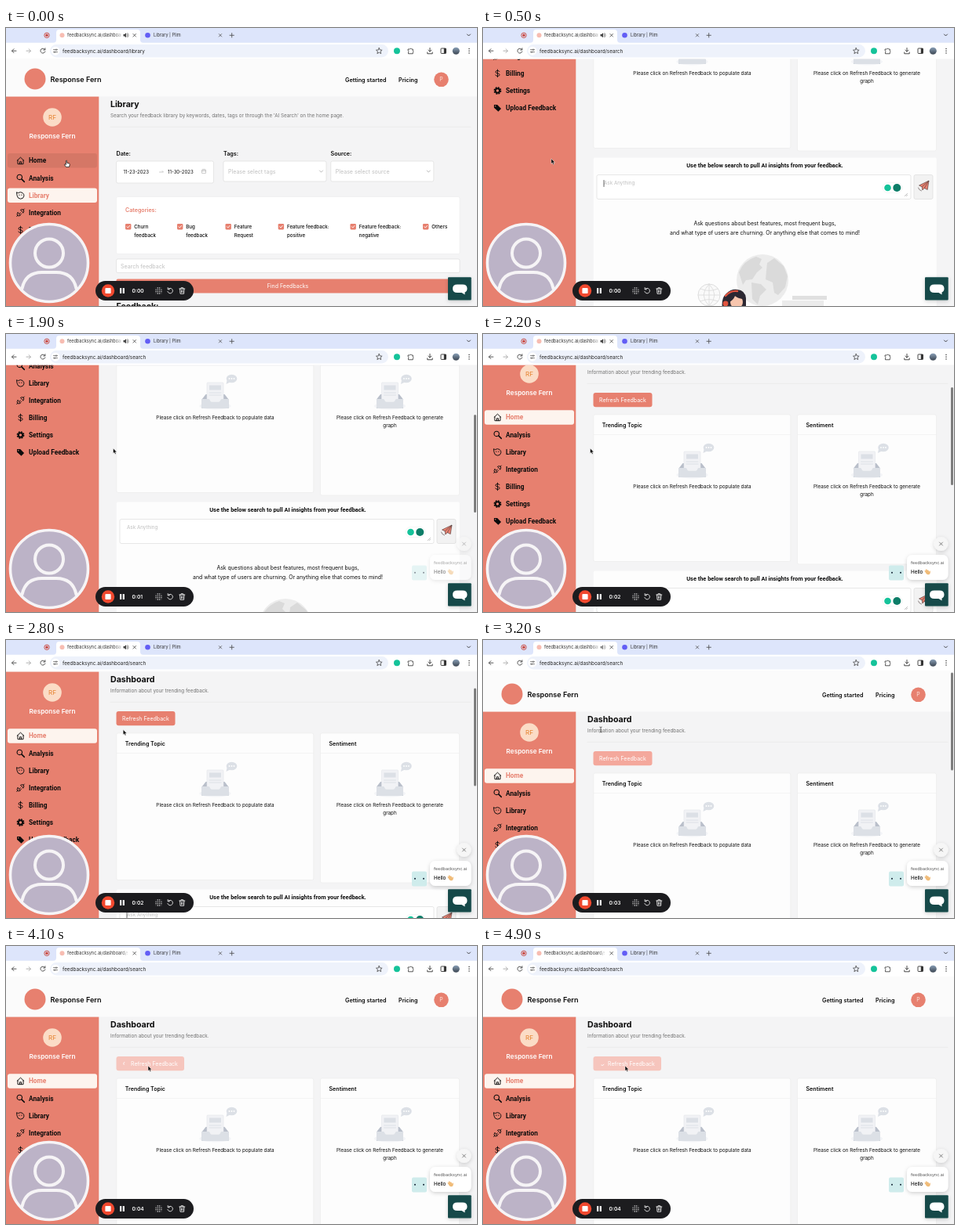
An HTML page that plays this animation: 600 px wide and 355 px high, repeating every 5 s.

```html
<!DOCTYPE html>
<html lang="en">
<head>
<meta charset="utf-8">
<title>Dashboard walkthrough</title>
<style>
html, body { margin: 0; width: 100%; height: 100%; overflow: hidden; background: #fff; }
svg { display: block; width: 100%; height: 100%; }
text { font-family: Inter, "Open Sans", sans-serif; white-space: pre; }
.rob { font-family: Roboto, Arial, sans-serif; }
</style>
</head>
<body>
<svg id="stage" viewBox="0 0 600 355"></svg>
<script>
const CORAL = '#e7806f', INK = '#0c0c0c', LOOP = 5000, STEP = 100;
const BRAND = 'Response Fern';

// Markup helpers
const text = (x, y, s, size, fill = INK, weight = 400, extra = '') =>
  `<text x="${x}" y="${y}" font-size="${size}" fill="${fill}" font-weight="${weight}" ${extra}>${s}</text>`;
const mid = 'text-anchor="middle"';
const box = (x, y, w, h, fill, r = 0, extra = '') =>
  `<rect x="${x}" y="${y}" width="${w}" height="${h}" rx="${r}" fill="${fill}" ${extra}/>`;
const dot = (x, y, r, fill, extra = '') => `<circle cx="${x}" cy="${y}" r="${r}" fill="${fill}" ${extra}/>`;
const line = (d, color = INK, w = 1, extra = '') =>
  `<path d="${d}" fill="none" stroke="${color}" stroke-width="${w}" stroke-linecap="round" stroke-linejoin="round" ${extra}/>`;
const shape = (d, fill, extra = '') => `<path d="${d}" fill="${fill}" ${extra}/>`;
const group = (id, body, extra = '') => `<g id="${id}" ${extra}>${body}</g>`;
const at = (x, y, body) => `<g transform="translate(${x} ${y})">${body}</g>`;
const cross = (x, y, r, color, w) =>
  line(`M${x - r} ${y - r}l${2 * r} ${2 * r}m0 ${-2 * r}l${-2 * r} ${2 * r}`, color, w);
const border = (c = '#d9d9d9') => `stroke="${c}" stroke-width=".6"`;

function browser() {
  return box(0, 0, 600, 39.5, '#fff') + box(0, 0, 600, 18.8, '#dde5fb') +
    dot(52, 9.3, 3.2, 'none', 'stroke="#c9453c" stroke-width=".9"') + dot(52, 9.3, 1.7, '#c9453c') +
    shape('M60 19q4 0 4-4V6q0-4 4-4h99q4 0 4 4v9q0 4 4 4z', '#fff') +
    dot(71.5, 9.3, 3, '#f7bdb2') +
    `<g clip-path="url(#tabClip)">${text(78, 11.3, 'feedbacksync.ai/dashboard/search', 5.6, '#333')}</g>` +
    box(146, 4, 10, 11, 'url(#tabFade)', 0, 'id="tabEnd"') +
    group('audio', shape('M149.5 8h1.5l2-1.8v6l-2-1.8h-1.5z', '#444') +
      line('M154 7.6q1.5 1.6 0 3.2M155 6.5q2.6 2.7 0 5.4', '#444', .6)) +
    cross(163.7, 9.3, 1.8, '#444', .8) +
    dot(180.5, 9.3, 3.3, '#625df5') + text(188, 11.3, 'Library | Plim', 5.6, '#333') +
    cross(273, 9.3, 1.7, '#555', .8) + line('M285 9.3h5.4m-2.7-2.7v5.4', '#444', .8) +
    line('M587.5 8l2 2 2-2', '#333', .9) +
    line('M13 29.2H7.6m2.4-2.5l-2.5 2.5 2.5 2.5', '#444', .9) +
    line('M26 29.2h5.4m-2.4-2.5l2.5 2.5-2.5 2.5', '#aaa', .9) +
    line('M49.6 27.6a3 3 0 1 0 .3 2.4M49.9 25.8v2.2h-2.2', '#444', .9) +
    box(56, 21, 431, 16.5, '#eef2fb', 8.2) + dot(63, 29.2, 5.5, '#fff') +
    line('M60.5 27.7h2.5m2 0h.5M60.5 30.7h.5m2 0h2.5', '#444', .7) +
    dot(64, 27.7, .8, 'none', 'stroke="#444" stroke-width=".6"') +
    dot(62, 30.7, .8, 'none', 'stroke="#444" stroke-width=".6"') +
    '<text id="url" x="72" y="31.5" font-size="6.35" fill="#222"></text>' +
    line('M475.3 25.5l1.1 2.5 2.7.2-2 1.8.6 2.7-2.4-1.5-2.4 1.5.6-2.7-2-1.8 2.7-.2z', '#444', .8) +
    dot(498, 29.2, 4, '#15c39a') +
    line('M512.5 27h2a1.2 1.2 0 0 1 2.2 0h1.6v2a1.2 1.2 0 0 1 0 2.2v1.6h-5.8v-2a1 1 0 0 0 0-1.8z', '#444', .9) +
    line('M540 25.5v4.5m-2-1.8l2 2 2-2M536.8 31v1.8h6.4V31', '#333', .9) +
    box(554, 26, 6.5, 6.5, 'none', .8, 'stroke="#333" stroke-width=".9"') + box(557.8, 26, 2.7, 6.5, '#333') +
    dot(573.3, 29.2, 4.5, 'url(#photo)') +
    [26.5, 29.2, 31.9].map(y => dot(590, y, .75, '#333')).join('');
}

const icons = [
  line('M-4.3-.2L0-4.3 4.3-.2M-3.5-.8v5h7v-5M-1 4.2V1.3h2v2.9', INK, .95),
  line('M1.3 1.3L4.8 4.8', INK, 1.5) + dot(-1.2, -1.2, 3.2, 'none', `stroke="${INK}" stroke-width="1.1"`),
  line('M-4.6-3.8l1.6.7Q0-5 2.6-3.2 4.8-1.500 4.400 1 3.600 4.500 0 4.500-3.800 4.300-4.400.5z', INK, .95) +
    dot(-1.6, -.5, .6, INK) + dot(1.4, -.5, .6, INK),
  line('M-4.8 4.8l1.6-1.6m6.4-6.4l1.6-1.6M-3.4 0l3.3 3.4q-2.2 1.6-3.7.1T-3.4 0zM3.4 0L0-3.4q2-1.600 3.700-.1T3.400 0zM-1.200 1l1-1M.2 2.200l1-1', INK, .95),
  line('M2.5-2.3Q2-3.5 0-3.5q-2.500.1-2.500 1.800 0 1.500 2.500 1.700 2.700.3 2.700 1.900Q2.600 3.500 0 3.500q-2.100 0-2.700-1.400M0-4.800V4.800', INK, .9),
  dot(0, 0, 2.7, 'none', `stroke="${INK}" stroke-width="2"`) +
    dot(0, 0, 4.2, 'none', `stroke="${INK}" stroke-width="1.4" stroke-dasharray="2 1.3"`),
  shape('M-4.5-4h4.2L4.6.8 1 4.6l-5.5-5z', INK) + dot(-2.7, -2.3, .8, CORAL)
];
const labels = ['Home', 'Analysis', 'Library', 'Integration', 'Billing', 'Settings', 'Upload Feedback'];
const navY = i => 172.5 + 22.1 * i;

function sidebar() {
  return box(0, 90, 118.3, 600, CORAL) + dot(59, 117, 11.8, '#fbdcc6') +
    text(59, 120, 'RF', 8.2, '#e5832f', 400, mid) + text(59, 144, BRAND, 8.2, '#fff', 600, mid) +
    box(2, 163, 114, 18.6, '#d57766', 3, 'id="hover"') + box(2, 163, 114, 18.6, '#fdf4ee', 3, 'id="active"') +
    labels.map((s, i) => at(18.5, navY(i), icons[i]) +
      text(29, navY(i) + 2.9, s, 8.3, INK, 700, 'class="rob nav"')).join('');
}

function header() {
  return box(0, -60, 600, 150.6, '#fbfbfb') + dot(37, 68, 13.5, CORAL) + text(56.5, 71.5, BRAND, 9.05, INK, 600) +
    text(432, 71.7, 'Getting started', 7.25, INK, 600) + text(500, 71.7, 'Pricing', 7.25, INK, 600) +
    dot(554.5, 68.8, 9.3, CORAL) + text(554.5, 71.4, 'P', 7, '#fde3dc', 400, mid);
}

const heading = (title, sub) => text(133, 104, title, 10.6, INK, 700) +
  text(133, 116.6, sub, 6.3, '#707070') + line('M133 129.3H592', '#e2e2e2', .6);

const select = (x, s) => box(x, 173, 131, 26, '#fff', 2, border()) + text(x + 6, 188.5, s, 7.05, '#bfbfbf') +
  line(`M${x + 122.5} 185l2 2.2 2-2.2`, '#aaa', .8);

function library() {
  const checks = [[152, 'Churn', 'feedback'], [218, 'Bug', 'feedback'], [279.5, 'Feature', 'Request'],
    [346.7, 'Feature feedback:', 'positive'], [438.5, 'Feature feedback:', 'negative'], [531, 'Others', '']];
  return heading('Library', "Search your feedback library by keywords, dates, tags or through the 'AI Search' on the home page.") +
    [[140.5, 'Date:'], [277, 'Tags:'], [413.5, 'Source:']].map(([x, s]) => text(x, 166, s, 7.2, INK, 600)).join('') +
    box(140.5, 173, 124, 28, '#fff', 2, border()) +
    text(149.5, 188.8, '11-23-2023', 6.05) + text(206, 188.8, '11-30-2023', 6.05) +
    line('M195.5 187h5l-1.5-1.5', '#aaa', .6) +
    box(249.5, 184, 5, 4.6, 'none', .4, border('#aaa')) + line('M249.5 185.7h5M251 183.2v1m2-1v1', '#aaa', .6) +
    select(277, 'Please select tags') + select(413.8, 'Please select source') +
    box(140.5, 218.5, 437.5, 73, '#fff', 2, border('#ececec')) + text(152, 238, 'Categories:', 7.1, CORAL, 600) +
    checks.map(([x, a, b]) => box(x, 253, 7.4, 7.4, CORAL, 1.3) +
      line(`M${x + 2} 256.7l1.3 1.4 2.2-2.6`, '#fff', .9) +
      text(x + 11.3, 259, a, 6.2, INK, 500) + text(x + 11.3, 269.5, b, 6.2, INK, 500)).join('') +
    box(140.5, 298, 437.5, 17.5, '#fff', 2, border()) + text(146, 309.5, 'Search feedback', 7.05, '#bfbfbf') +
    box(140.5, 323.5, 437.5, 18, CORAL, 2) + text(359, 335, 'Find Feedbacks', 7.05, '#fff', 400, mid) +
    text(140.5, 362, 'Feedback:', 10.6, INK, 700);
}

const emptyBox = x => at(x, 0,
  '<ellipse cy="246" rx="20" ry="4.5" fill="#f3f4f7"/>' +
  shape('M-12 231h24l5 6.5v11.5h-34v-11.5z', '#b9bfca') + box(-10.5, 216, 21, 25, '#f1f2f5', 1, border('#e2e4ea')) +
  box(-7.5, 219.5, 15, 6, '#dce0e6') + line('M-7.5 229h15m-15 3h15', '#dce0e6', 1) +
  shape('M-17 237h8.5q1.5 0 2 2 .6 2 2.5 2h8q1.9 0 2.5-2 .5-2 2-2H17v10.5q0 1.5-1.5 1.5h-31q-1.5 0-1.5-1.5z', '#dce0e6') +
  '<ellipse cx="21" cy="211" rx="6.8" ry="5.2" fill="#dce0e6"/>' + shape('M15 213l-1 5 5-2.5z', '#dce0e6') +
  [18, 21, 24].map(d => dot(d, 211, .9, '#fff')).join(''));

function globes() {
  return dot(356, 525, 33, '#ececec') +
    shape('M326 515q6-15 22-20l7 3-3 7 4 4-7 6-6 9-8 1-4 6z', '#dadada') +
    shape('M342 528l12 2 7 7-8 8-3 11-7-7z', '#dadada') +
    shape('M362 503l9-6 12 10 5 13-3 14-9 10-5-3-2-13-9-4 1-11z', '#dadada') +
    dot(288, 544, 14, '#fafafa', 'stroke="#ddd"') +
    line('M274 544h28M288 530v28M277 536q11 5 22 0M277 552q11-5 22 0M288 530q-14 14 0 28M288 530q14 14 0 28', '#ddd', .9) +
    box(394, 545, 44, 5, '#e0e0e0') + box(381, 551, 53, 8, '#ebebeb');
}

function woman() {
  const hair = '#2c2832';
  return shape('M305 562q-2-14 5-20 6-6 14-5 10 1 11 11v14z', hair) +
    line('M309 545q6-7 15-6', '#e0543f', 2.4) + dot(323, 553, 8, '#f7c5ad') +
    shape('M312 554q1-13 12-13 8 0 9 8-8 0-12-4-2 6-9 9z', hair) + dot(309, 555, 3.4, '#e0543f');
}

function dashboard() {
  const card = (x, w, h, s) => box(x, 169, w, h, '#fdfdfd', 2, border('#eaeaea')) +
    text(x + 11, 184.6, s, 7.1, INK, 600) + line(`M${x} 194.5h${w}`, '#eeeeee', .6);
  const hint = (x, y, s) => text(x, y, s, 6.3, INK, 400, mid);
  return heading('Dashboard', 'Information about your trending feedback.') +
    box(140.5, 141, 75, 18.3, CORAL, 3, 'id="btn"') + text(148, 152.7, 'Refresh Feedback', 7, '#fff', 400, 'id="btnText"') +
    line('M2.3 0A2.3 2.3 0 0 1 0 2.3', '#fff', .8, 'id="spin"') +
    card(140.8, 251, 187.5, 'Trending Topic') + card(400.5, 177, 191, 'Sentiment') +
    emptyBox(266.5) + emptyBox(489) +
    hint(266.5, 262.8, 'Please click on Refresh Feedback to populate data') +
    hint(489, 262.8, 'Please click on Refresh Feedback to generate') + hint(489, 272.8, 'graph') +
    box(140.8, 368.5, 437, 300, '#fdfdfd', 2) +
    text(359, 380.8, 'Use the below search to pull AI insights from your feedback.', 7.4, INK, 700, mid + ' class="rob"') +
    box(145, 390.5, 400, 31, '#fff', 2, border()) + text(154, 403.2, 'Ask Anything', 6.3, '#bfbfbf') +
    line('M154 397.5v8', '#222', .7, 'id="caret"') +
    box(509, 400.5, 25, 13, '#fff', 6.5, border('#eee')) + dot(515.5, 407, 4.3, '#15c39a') + dot(527.3, 407, 5, '#0d7d68') +
    line('M537.5 417.5l3-3m-1 3l1-1', '#888', .6) +
    box(549, 390.5, 24, 31, '#f2f2f2', 2, border()) +
    shape('M555.5 404l12.5-6-1.8 11.5-4-2-2.4 2.5-.5-4z', CORAL, 'stroke="#4b3a3a" stroke-width=".6"') +
    line('M559.5 405.5l8.5-7.5-5.8 9.5M554.5 407q.5 3 4 4', '#4b3a3a', .6) +
    text(359, 455.4, 'Ask questions about best features, most frequent bugs,', 6.92, INK, 400, mid) +
    text(359, 467.2, 'and what type of users are churning. Or anything else that comes to mind!', 6.92, INK, 400, mid) +
    globes() + woman();
}

function chat() {
  const wave = shape('M-3-1.5q1-1.5 2 0l-.8-1.7q.8-1.2 1.7 0l.6 1q.7-1 1.5 0l.9 2 .5-1.4q1.2-.2 1 1.4-.2 3.2-2.3 3.5-1.7.2-3-1.4z', '#f0bb78');
  return group('greeting',
    box(517, 295.5, 19, 19, '#cfecec', 2) + dot(521, 304.8, 1, '#123') + dot(532, 304.8, 1, '#123') +
    box(540, 282, 52.5, 32, '#fff', 7, 'filter="url(#soft)"') +
    text(545, 294.3, 'feedbacksync.ai', 5.45, '#555') + text(545, 306.3, 'Hello', 6.3, '#111', 500) + at(565.5, 304, wave) +
    dot(583.5, 268, 9, '#f6f6f6', 'filter="url(#soft)"') + cross(583.5, 268, 2, '#666', .8)) +
    box(563, 318.2, 29.7, 29.4, '#154a49', 1, 'filter="url(#soft)"') +
    shape('M575 327.5h6.500q6 0 6 5.300 0 3.500-3 4.800v3l-4-2.500H575q-6 0-6-5.300t6-5.300z', '#fff');
}

function recorder() {
  const grid = [-3, -1, 1, 3], lilac = '#bcb3c7', pale = '#f6f4f6';
  const dots = grid.flatMap(x => grid.map(y =>
    dot(194.5 + x * 1.15, 335.5 + y * 1.15, Math.abs(x * y) === 9 ? .35 : .7, '#eee'))).join('');
  return dot(55, 300, 49.5, lilac, `stroke="${pale}" stroke-width="3.6"`) +
    dot(55, 287.5, 18, lilac, `stroke="${pale}" stroke-width="4"`) +
    line('M20.5 332.5Q25 312 46 312h18q21 0 25.5 20.5', pale, 4) +
    box(114, 323, 125, 25, '#1c1c1f', 12.5) + dot(130, 335.5, 8.2, '#f1492f') + box(126.4, 331.9, 7.2, 7.2, '#fff', 1) +
    box(145, 332, 2.2, 7, '#fff', .5) + box(148.7, 332, 2.2, 7, '#fff', .5) +
    '<text id="clock" x="160.5" y="338" font-size="6.6" font-weight="600" fill="#fff"></text>' + dots +
    line('M206.5 333.5a3.3 3.3 0 1 1-.6 3M206.2 331.5v2.3h2.3', '#eee', .9) +
    line('M220.8 333h7M223 333v-1.3h2.6v1.3M221.6 333l.4 6.3h4.6l.4-6.3M223.5 335v2.5m1.6-2.5v2.5', '#eee', .9);
}

const pointers =
  group('arrow', shape('M0 0v6.5l1.5-1.3 1 2.4 1.2-.5-1-2.3h2z', '#000', 'stroke="#fff" stroke-width=".5"')) +
  group('hand', shape('M-.6-3.5q.9-.9 1.4.2v2.6l2.7.7q.9.4.7 1.4l-.6 3H-.6L-2.4 1.8q-.3-1 .7-.9l1.1.6z', '#fff', 'stroke="#000" stroke-width=".7"')) +
  group('beam', line('M-1.2-3.5q1.2 0 1.2.8v5.4q0 .8-1.2.8M1.2-3.5Q0-3.5 0-2.7M0 2.7q0 .8 1.2.8', '#333', .7));

const stage = document.getElementById('stage');
stage.innerHTML = `<defs>
  <clipPath id="view"><rect y="39.5" width="600" height="316"/></clipPath>
  <clipPath id="tabClip"><rect id="tabRoom" x="78" width="77" height="18"/></clipPath>
  <linearGradient id="tabFade"><stop stop-color="#fff" stop-opacity="0"/><stop offset="1" stop-color="#fff"/></linearGradient>
  <linearGradient id="photo" x2="0" y2="1"><stop stop-color="#8aa0b8"/><stop offset="1" stop-color="#3c4652"/></linearGradient>
  <filter id="soft" x="-40%" y="-40%" width="180%" height="190%"><feDropShadow dx="0" dy="1.5" stdDeviation="2.5" flood-opacity=".18"/></filter>
  </defs>` + box(0, 0, 600, 355, '#f4f4f5') +
  `<g clip-path="url(#view)">${group('page', group('lib', library()) + group('dash', dashboard()) + sidebar() + header())}
  ${box(596, 41, 3, 125, '#7d7d7d', 1.5, 'id="bar"')}</g>` +
  browser() + chat() + recorder() + group('cursor', pointers);

const el = {};
stage.querySelectorAll('[id]').forEach(n => el[n.id] = n);
const navText = stage.querySelectorAll('.nav');

const clamp = v => Math.max(0, Math.min(1, v));
const ramp = (t, a, b) => clamp((t - a) / (b - a));
function track(keys, t) {
  let i = 0;
  while (i < keys.length - 2 && t >= keys[i + 1][0]) i++;
  const [ta, a] = keys[i], [tb, b] = keys[i + 1];
  return a + (b - a) * ramp(t, ta, tb);
}
const set = (n, attrs) => { for (const k in attrs) n.setAttribute(k, attrs[k]); };
const show = (n, on) => n.setAttribute('visibility', on ? 'visible' : 'hidden');
const mix = (a, b, p) => `rgb(${a.map((v, i) => Math.round(v + (b[i] - v) * p))})`;

const OPEN = 400, CLICK = 3800;
const scrollKeys = [[1600, 203], [1700, 195], [1800, 178], [1900, 154], [2000, 110], [2100, 78], [2200, 66],
  [2500, 66], [2700, 58], [2800, 50], [2900, 28], [3000, 8], [3100, -1], [3200, -1], [3300, 0]];
const xKeys = [[400, 77], [1000, 136.5], [2450, 136.5], [2700, 149], [3200, 150], [3500, 181]];
const yKeys = [[400, 171], [1000, 146], [2450, 146], [2700, 114.5], [3200, 114.5], [3500, 153]];

function pointerAt(t) {
  if (t <= OPEN || (t >= 3400 && t < CLICK)) return 'hand';
  return t >= 3100 && t < 3400 ? 'beam' : 'arrow';
}

function draw(t) {
  const opened = t >= OPEN, busy = t >= CLICK;
  const scroll = opened ? track(scrollKeys, t) : 3;
  set(el.page, { transform: `translate(0 ${-scroll})` });
  set(el.lib, { display: opened ? 'none' : 'inline' });
  set(el.dash, { display: opened ? 'inline' : 'none' });
  el.url.textContent = 'feedbacksync.ai/dashboard/' + (opened ? 'search' : 'library');

  const current = opened ? 0 : 2;
  set(el.active, { y: navY(current) - 9.3 });
  show(el.hover, !opened);
  navText.forEach((n, i) => set(n, { fill: i === current ? CORAL : INK }));

  const base = [231, 128, 111], light = [244, 168, 156], pale = [246, 197, 189];
  const fill = busy ? mix(light, pale, ramp(t, CLICK, CLICK + 200)) : mix(base, light, ramp(t, 2850, 3050));
  set(el.btn, { fill, width: busy ? 86.5 : 75 });
  set(el.btnText, { x: busy ? 159 : 148 });
  set(el.spin, { transform: `translate(152 150.2) rotate(${t * .3})` });
  show(el.spin, busy);
  set(el.caret, { opacity: (t + 700) % 1000 < 520 ? 1 : 0 });

  set(el.bar, { y: 41.5 + Math.max(0, scroll) * .4, opacity: ramp(t, 1550, 1700) * (1 - ramp(t, 3600, 3900)) });
  set(el.greeting, { opacity: ramp(t, 1700, 2100) });
  const sound = 1 - ramp(t, 2900, 3700);
  set(el.audio, { opacity: sound });
  set(el.tabEnd, { x: sound > 0 ? 139 : 147 });
  set(el.tabRoom, { width: sound > 0 ? 69 : 77 });
  el.clock.textContent = '0:0' + Math.floor(t / 1000);

  const kind = pointerAt(t);
  for (const k of ['arrow', 'hand', 'beam']) show(el[k], k === kind);
  const lift = kind === 'hand' ? 2 : 0;
  set(el.cursor, { transform: `translate(${track(xKeys, t)} ${track(yKeys, t) + lift})` });
}

const start = performance.now();
function frame(now) {
  const t = Math.max(0, now - start) % LOOP;
  draw(Math.floor(t / STEP) * STEP);
  requestAnimationFrame(frame);
}
draw(0);
requestAnimationFrame(frame);
</script>
</body>
</html>
```
